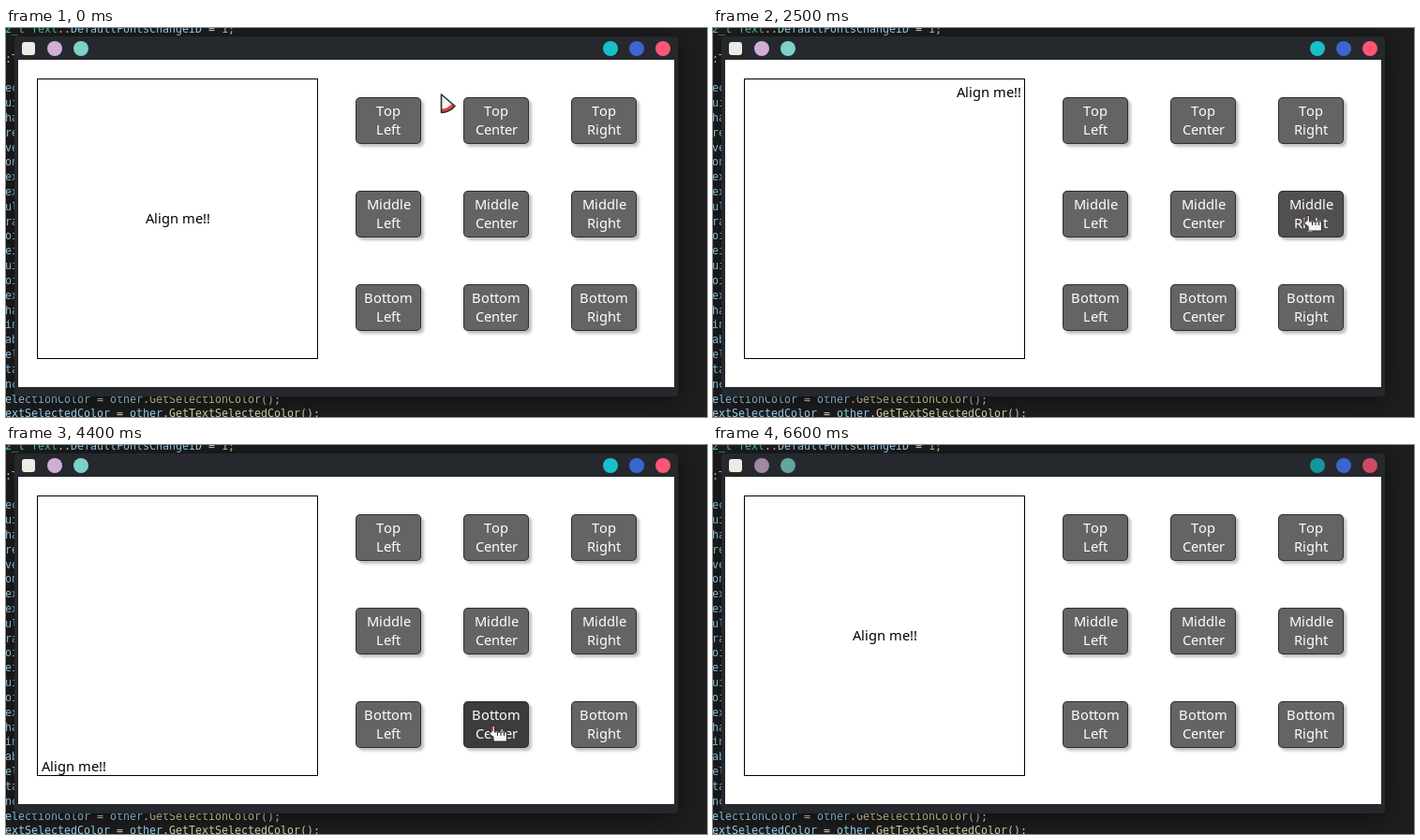
An HTML page with a canvas for the animation above (6800 ms loop, 748 by 416 pixels).

```html
<!DOCTYPE html>
<html lang="en">
<head>
<meta charset="utf-8">
<title>Text alignment demo</title>
<style>
  html, body { margin: 0; width: 100%; height: 100%; overflow: hidden; background: #1e1e1e; }
  canvas { display: block; }
</style>
</head>
<body>
<canvas id="stage" width="748" height="416"></canvas>
<script>
const ctx = document.getElementById('stage').getContext('2d');
const LOOP = 6800, TICK = 100, TRAVEL = 300;
const EXIT = 5600, EXIT_TRAVEL = 600, POINTER_END = 6300, UNFOCUS = 6600;
const ROWS = ['Top', 'Middle', 'Bottom'], COLS = ['Left', 'Center', 'Right'];
const BASELINES = [74, 209, 349];

// Each visit: button, time the pointer sets off, time of the press
const VISITS = [
  [0, 100, 700], [1, 900, 1500], [2, 1600, 2100], [5, 2200, 2700], [4, 2800, 3200],
  [3, 3300, 3700], [6, 3800, 4100], [7, 4200, 4400], [8, 4500, 4700], [4, 4800, 5500]
];

const rowOf = i => Math.floor(i / 3);
const buttonPos = i => [373 + i % 3 * 115, 74 + rowOf(i) * 100];
const easeOut = k => 1 - (1 - k) ** 2;

// All pointer moves: start time, duration, end point
const MOVES = VISITS.map(([button, leave, press]) => {
  const [x, y] = buttonPos(button);
  return [leave, Math.min(TRAVEL, press - leave - TICK), x + 32, y + 26];
});
MOVES.push([EXIT, EXIT_TRAVEL, 48, 1]);

function pointerAt(t) {
  let x = 464, y = 70;
  for (const [start, duration, endX, endY] of MOVES) {
    if (t <= start) break;
    const k = easeOut(Math.min(1, (t - start) / duration));
    x += (endX - x) * k;
    y += (endY - y) * k;
  }
  return [Math.round(x), Math.round(y)];
}

function buttonAt([px, py]) {
  for (let i = 0; i < 9; i++) {
    const [x, y] = buttonPos(i);
    if (px >= x && px < x + 70 && py >= y && py < y + 50) return i;
  }
  return -1;
}

function roundRect(x, y, w, h, r, fill) {
  ctx.beginPath();
  ctx.roundRect(x, y, w, h, r);
  ctx.fillStyle = fill;
  ctx.fill();
}

function shadow(color, blur, dx, dy) {
  ctx.shadowColor = color;
  ctx.shadowBlur = blur;
  ctx.shadowOffsetX = dx;
  ctx.shadowOffsetY = dy;
}

// Glyphs sit on whole pixels
const advance = char => Math.round(ctx.measureText(char).width);

function drawText(text, x, y) {
  for (const char of text) {
    ctx.fillText(char, x, y);
    x += advance(char);
  }
  return x;
}

function drawCentered(text, x, y) {
  const width = [...text].reduce((sum, char) => sum + advance(char), 0);
  drawText(text, Math.round(x - width / 2), y);
}

function drawCode() {
  ctx.fillStyle = '#1e1e1e';
  ctx.fillRect(0, 0, 748, 416);
  ctx.font = '11.63px "DejaVu Sans Mono", monospace';
  const line = (row, ...parts) => {
    let x = -1;
    for (const [text, color] of parts) {
      ctx.fillStyle = color;
      x = drawText(text, x, Math.round(5 + row * 15.82));
    }
  };
  const teal = '#4ec9b0', blue = '#9cdcfe', gray = '#d4d4d4', call = '#dcdcaa';
  line(0, ['2_t Text', teal], ['::', gray], ['DefaultFontsChangeID', blue], [' = ', gray], ['1', '#b5cea8'], [';', gray]);
  line(2, [':T', gray]);
  'ec ui ha re ve on ex ex ul ra oi ei ui oi ex ha in ab el ta nc'.split(' ')
    .forEach((s, i) => line(i + 4, [s, blue]));
  const assign = (row, field, getter) =>
    line(row, [field, blue], [' = ', gray], ['other', blue], ['.', gray], [getter, call], ['();', gray]);
  assign(25, 'electionColor', 'GetSelectionColor');
  assign(26, 'extSelectedColor', 'GetTextSelectedColor');
}

function drawWindow(focused) {
  shadow('rgba(0,0,0,.5)', 28, 0, 4);
  roundRect(9, 9, 708, 385, 4, '#25282d');
  shadow('transparent', 0, 0, 0);
  ctx.fillStyle = '#fff';
  ctx.fillRect(13, 34, 700, 350);
  roundRect(17, 15, 14, 14, 3, '#eeeae4');
  const dots = focused
    ? ['#d0aed6', '#7dd1c8', '#18bfc9', '#3b66cf', '#ff5577']
    : ['#a088a6', '#65a39d', '#17949c', '#3b66cf', '#cd4a63'];
  dots.forEach((color, i) => roundRect((i < 2 ? 44 : 581) + i * 28, 14, 16, 16, 8, color));
  ctx.strokeStyle = '#000';
  ctx.lineWidth = 1;
  ctx.strokeRect(33.5, 54.5, 299, 299);
}

function drawButton(i, fill) {
  const [x, y] = buttonPos(i);
  shadow('rgba(0,0,0,.25)', 3, 3, 3);
  roundRect(x, y, 70, 50, 5, '#2d2d2d');
  shadow('transparent', 0, 0, 0);
  roundRect(x + 1, y + 1, 68, 48, 4, fill);
  ctx.fillStyle = '#fff';
  drawCentered(ROWS[rowOf(i)], x + 35, y + 20);
  drawCentered(COLS[i % 3], x + 35, y + 40);
}

function outline(path, width) {
  ctx.strokeStyle = '#2e2e2e';
  ctx.lineWidth = width;
  ctx.lineJoin = 'round';
  ctx.stroke(path);
}

function drawArrow() {
  const wedge = new Path2D('M.5 1V20.5Q9 20.5 15 13.5Z');
  ctx.fillStyle = '#f4f4f4';
  ctx.fill(wedge);
  ctx.fillStyle = '#d9453d';
  ctx.fill(new Path2D('M.5 20.5Q9 20.5 15 13.5L12 11Q7 16.5 .5 16.5Z'));
  outline(wedge, 1.6);
}

function drawHand() {
  const hand = new Path2D('M-2 .5H1.5V7H14.5V17H0V12.5L-4 9.5V7H-2Z');
  ctx.fillStyle = '#f4f4f4';
  ctx.fill(hand);
  ctx.fillStyle = '#d9453d';
  ctx.fillRect(-1.5, 1, 1.5, 5);
  outline(hand, 1.2);
  outline(new Path2D('M4.5 7V11M8 7V11M11.5 7V11'), 1);
}

function draw(t) {
  const pos = pointerAt(t), over = buttonAt(pos);
  const hover = over === buttonAt(pointerAt(t - TICK)) ? over : -1;
  const pressing = VISITS.some(v => v[2] === t);
  const done = VISITS.filter(v => v[2] < t).pop();
  const align = done ? done[0] : 4;

  drawCode();
  drawWindow(t < UNFOCUS);
  ctx.font = '14.67px "Noto Sans", sans-serif';
  for (let i = 0; i < 9; i++) {
    drawButton(i, i !== hover ? '#646464' : pressing ? '#3c3c3c' : '#505050');
  }
  ctx.fillStyle = '#000';
  drawText('Align me!!', 38 + align % 3 * 111, BASELINES[rowOf(align)]);

  if (t < POINTER_END) {
    ctx.save();
    ctx.translate(...pos);
    if (over < 0) drawArrow(); else drawHand();
    ctx.restore();
  }
}

function frame(now) {
  draw(Math.floor(now % LOOP / TICK) * TICK);
  requestAnimationFrame(frame);
}
requestAnimationFrame(frame);
</script>
</body>
</html>
```
